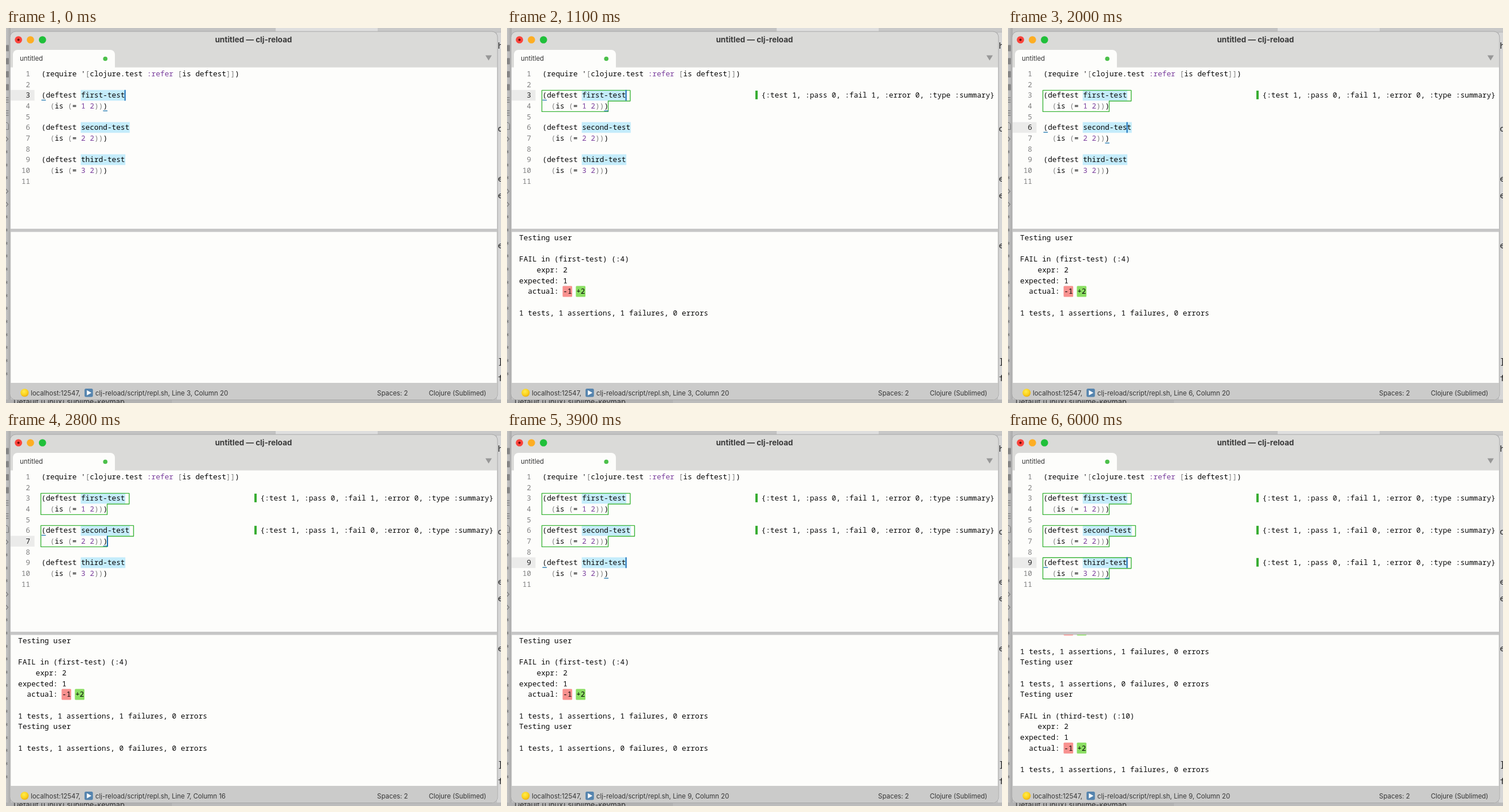
Recreate the animation shown at these times as an HTML page. Size 859x652 px, loop 6100 ms.

```html
<!DOCTYPE html>
<html lang="en">
<head>
<meta charset="utf-8">
<title>Running tests in the editor</title>
<style>
  html, body { margin: 0; width: 100%; height: 100%; overflow: hidden; background: #c6c6c6; }
  svg { display: block; width: 859px; height: 652px; }
  text { white-space: pre; }
  .mono { font: 500 12.73px "Noto Sans Mono", monospace; fill: #080808; }
  .ui { font: 11.4px Inter, sans-serif; fill: #363636; }
  .title { font: 700 13.5px Inter, sans-serif; fill: #3a3a3a; text-anchor: middle; }
  .num { text-anchor: end; fill: #808080; }
  .num.on { fill: #222; }
  .dim { fill: #808080; }
  .lit { fill: #7a3e9d; }
  .side { font: 16px Inter, sans-serif; fill: #777; text-anchor: middle; }
  .edge { font: 15px "Noto Sans Mono", monospace; fill: #222; }
  .file { font: 12.8px Inter, sans-serif; fill: #333; }
  .end { text-anchor: end; }
</style>
</head>
<body>
<svg viewBox="0 0 859 652" xmlns="http://www.w3.org/2000/svg">
  <defs>
    <radialGradient id="sun" cx=".42" cy=".35" r=".7">
      <stop offset="0" stop-color="#ffec4e"/>
      <stop offset=".6" stop-color="#fcd21e"/>
      <stop offset="1" stop-color="#e5a512"/>
    </radialGradient>
    <linearGradient id="shade">
      <stop offset="0" stop-color="#c4c4c4"/>
      <stop offset="1" stop-color="#aaa"/>
    </linearGradient>
    <clipPath id="panel"><rect x="8" y="354" width="844" height="263"/></clipPath>
  </defs>

  <g id="desktop">
    <rect width="859" height="652" fill="#c2c2c2"/>
    <rect width="8" height="652" fill="url(#shade)"/>
    <rect x="468" width="177" height="6" fill="#dedede"/>
    <rect x="645" width="214" height="6" fill="#c8c8c8"/>
    <rect x="852" y="8" width="7" height="644" fill="#d6d6d6"/>
    <rect y="646" width="288" height="6" fill="#b2b2b2"/>
    <rect x="288" y="646" width="571" height="6" fill="#bcbcbc"/>
    <text class="file" x="13" y="654">Default (Linux).sublime-keymap</text>
  </g>

  <g id="window">
    <rect x="7" y="6" width="846" height="640.5" rx="10" fill="#dadad8" stroke="#a8a8a8" stroke-width="1"/>
    <path d="M8 617H852V636.5a9.5 9.5 0 0 1-9.5 9.5H17.5A9.5 9.5 0 0 1 8 636.5Z" fill="#cbcbca"/>
    <circle cx="21.6" cy="20.5" r="6.3" fill="#fb443c"/>
    <circle cx="21.6" cy="20.5" r="2" fill="#6b0d0a"/>
    <circle cx="42.4" cy="20.5" r="6.3" fill="#fdae24"/>
    <circle cx="63.3" cy="20.5" r="6.3" fill="#20c03a"/>
    <text class="title" x="429.5" y="25">untitled — clj-reload</text>
    <path d="M12 69V46a8 8 0 0 1 8-8H181a8 8 0 0 1 8 8V69Z" fill="#fdfdfb"/>
    <text class="ui" x="24" y="57">untitled</text>
    <circle cx="172.3" cy="53.5" r="3.8" fill="#4cc04a"/>
    <path d="M832 47.5H843L837.5 56.5Z" fill="#979797"/>
    <rect x="8" y="68.5" width="844" height="280.5" fill="#fdfdfb"/>
    <rect x="8" y="349" width="844" height="6" fill="#c6c6c6"/>
    <rect x="8.5" y="354.5" width="843" height="262.5" fill="#fdfdfb"/>
    <circle cx="32.3" cy="634.3" r="7" fill="url(#sun)"/>
    <rect x="136.3" y="627" width="14.5" height="14.5" rx="2.5" fill="#5584ae"/>
    <path d="M140.3 629.8L148.3 634.2L140.3 638.7Z" fill="#fff"/>
    <text class="ui" x="43" y="638.7">localhost:12547,</text>
    <text class="ui" x="155" y="638.7" id="status"></text>
    <text class="ui end" x="697.5" y="638.7">Spaces: 2</text>
    <text class="ui end" x="833.5" y="638.7">Clojure (Sublimed)</text>
  </g>

  <g id="editor"></g>
  <g id="live"></g>
  <g clip-path="url(#panel)"><g id="output"></g></g>
</svg>

<script>
const LOOP = 6100, COL = 7.638, ROW = 18.65, LEFT = 61.5, TOP = 70.4, BASE = 13.6;
const $ = id => document.getElementById(id);
const colX = c => LEFT + c * COL;
const rowY = line => TOP + (line - 1) * ROW;

// start time, cursor line, cursor column, finished test runs
const steps = [
  [0, 3, 20, 0],
  [700, 3, 20, 1],
  [1500, 4, 16, 1],
  [1700, 5, 1, 1],
  [1900, 6, 20, 1],
  [2400, 6, 20, 2],
  [2700, 7, 16, 2],
  [2900, 8, 1, 2],
  [3100, 9, 20, 2],
  [4000, 9, 20, 3]
];

const tests = [
  { line: 3, name: "first-test", value: 1 },
  { line: 6, name: "second-test", value: 2 },
  { line: 9, name: "third-test", value: 3 }
];

const rect = (x, y, w, h, fill, rx = 0) =>
  `<rect x="${x}" y="${y}" width="${w}" height="${h}" rx="${rx}" fill="${fill}"/>`;
const text = (x, y, s, cls = "mono") => `<text class="${cls}" x="${x}" y="${y}">${s}</text>`;

function paint(code) {
  return code.replace(/:\w+|\b\d\b|[()[\]]/g, (m, at) => {
    if (/[:\d]/.test(m)) return `<tspan class="lit">${m}</tspan>`;
    const outer = at === 0 || at === code.length - 1;
    return outer ? m : `<tspan class="dim">${m}</tspan>`;
  });
}

function drawSides() {
  let s = "";
  for (let i = 0; i < 4; i++) s += rect(0, 29.5 + i * 22.7, 5, 11, "#858585", 1);
  for (let i = 0; i < 22; i++) {
    const y = 125 + i * 22.7;
    if (i < 2) {
      for (const d of [-4, 0, 4]) s += rect(0, y + d - .5, 4.5, 1.2, "#777");
    } else if (i === 2) {
      s += `<path d="M0 ${y - 6}H2L4.5 ${y - 3}V${y + 6}H0" fill="none" stroke="#777"/>`;
    } else if (i === 3 || i === 7 || i === 8) {
      s += `<path d="M0 ${y - 4}L3.5 ${y}L0 ${y + 4}" fill="none" stroke="#777" stroke-width="1.2"/>`;
    } else {
      s += text(0, y + 8, "*", "side");
    }
  }
  const letters = [["h", 36], ["d", 180], ["e", 267], ["e", 296], ["e", 383], ["]", 584], ["f", 614]];
  for (const [c, y] of letters) s += text(853.5, y, c, "edge");
  $("desktop").insertAdjacentHTML("beforeend", s);
}

function drawEditor() {
  const code = ["(require '[clojure.test :refer [is deftest]])", ""];
  let s = "";
  for (const t of tests) {
    code.push(`(deftest ${t.name}`, `  (is (= ${t.value} 2)))`, "");
    s += rect(colX(9) - .5, rowY(t.line), t.name.length * COL + 1, ROW, "#c4ecfb");
  }
  code.forEach((c, i) => s += text(LEFT, rowY(i + 1) + BASE, paint(c)));
  $("editor").innerHTML = s;
}

function resultMark(t, fails) {
  const y = rowY(t.line) + .7, mid = y + ROW, low = mid + ROW - .3;
  const x = 60.5, far = colX(10 + t.name.length) - .5, near = colX(15) - .5;
  const summary = `{:test 1, :pass ${1 - fails}, :fail ${fails}, :error 0, :type :summary}`;
  return `<path d="M${x} ${y}H${far}V${mid}H${near}V${low}H${x}Z" fill="none"
      stroke="#3fb63c" stroke-width="1.4" stroke-linejoin="round"/>` +
    rect(431, y + .5, 4, 15, "#38ac32") + text(441.5, rowY(t.line) + BASE, summary);
}

function drawLive(line, col, runs) {
  let s = rect(8, rowY(line), 41.5, ROW, "#ebebea");
  for (let n = 1; n <= 11; n++) {
    s += text(42, rowY(n) + BASE, n, n === line ? "mono num on" : "mono num");
  }
  tests.slice(0, runs).forEach(t => s += resultMark(t, t.value === 2 ? 0 : 1));
  if (line % 3 < 2) {
    const top = line - line % 3;
    s += rect(LEFT, rowY(top) + 17, COL, 1.4, "#2b7fb4");
    s += rect(colX(14), rowY(top + 1) + 17, COL, 1.4, "#2b7fb4");
  }
  s += rect(colX(col - 1) - 1, rowY(line), 2, ROW, "#1a6fb8");
  $("live").innerHTML = s;
  $("status").textContent = `clj-reload/script/repl.sh, Line ${line}, Column ${col}`;
}

function drawOutput(runs) {
  const lines = [];
  for (const t of tests.slice(0, runs)) {
    const fails = t.value === 2 ? 0 : 1;
    lines.push("Testing user", "");
    if (fails) {
      lines.push(`FAIL in (${t.name}) (:${t.line + 1})`,
        "    expr: 2", "expected: 1", "  actual: -1 +2", "");
    }
    lines.push(`1 tests, 1 assertions, ${fails} failures, 0 errors`);
  }
  const scroll = runs === 3 ? 6 : 0;
  let s = "";
  lines.forEach((l, i) => {
    const y = 355.4 + (i - scroll) * ROW;
    if (l.startsWith("  actual")) {
      s += rect(96.5, y - .2, 16.6, ROW + .4, "#f8918f", 1.5);
      s += rect(119.5, y - .2, 16.6, ROW + .4, "#8bdf63", 1.5);
    }
    s += text(21, y + BASE, l);
  });
  $("output").innerHTML = s;
}

let shown = null;
function frame() {
  const t = performance.now() % LOOP;
  const step = steps.filter(s => s[0] <= t).pop();
  if (step !== shown) {
    shown = step;
    const [, line, col, runs] = step;
    drawLive(line, col, runs);
    drawOutput(runs);
  }
  requestAnimationFrame(frame);
}

drawSides();
drawEditor();
frame();
</script>
</body>
</html>
```
